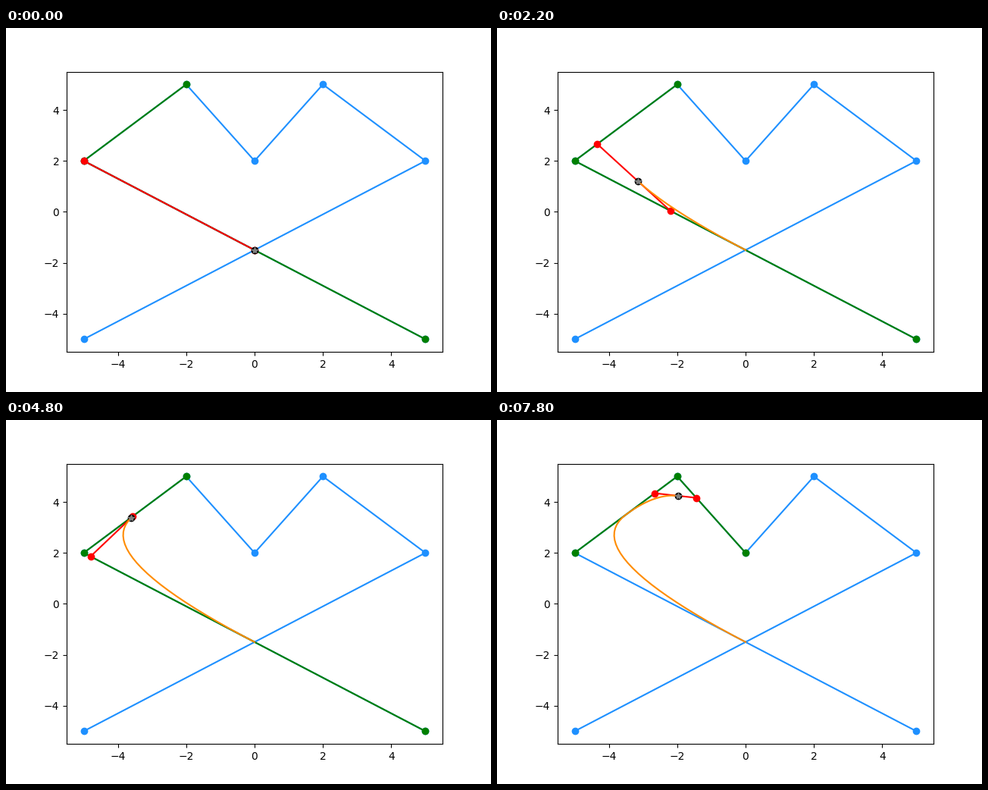
These frames come from a looping animation (640 px wide and 480 px high, 8 s). A matplotlib script:

```python
import numpy as np
import matplotlib.pyplot as plt
from matplotlib.animation import FuncAnimation

FRAMES = 40
INTERVAL = 200
STEP = 0.04

ctrl = np.array([(5, -5), (-5, 2), (-2, 5), (0, 2), (2, 5), (5, 2), (-5, -5)], float)


def lerp(a, b, t):
    return (1 - t) * a + t * b


def de_boor(i):
    """Active control points, inner points and curve point at step i."""
    seg, k = divmod(i, round(1 / STEP))
    t = k * STEP
    p = ctrl[seg:seg + 3]
    inner = np.array([lerp(p[0], p[1], (t + 1) / 2), lerp(p[1], p[2], t / 2)])
    return p, inner, lerp(inner[0], inner[1], t)


fig, ax = plt.subplots(figsize=(6.4, 4.8), dpi=100)
ax.set_xlim(-5.5, 5.5)
ax.set_ylim(-5.5, 5.5)

ax.plot(*ctrl.T, "o-", color="dodgerblue")
active, = ax.plot([], [], "o-", color="green")
chord, = ax.plot([], [], "o-", color="red")
dot, = ax.plot([], [], "o", color="black")
curve, = ax.plot([], [], color="darkorange")
star, = ax.plot([], [], "*", color="gray")

path = np.array([de_boor(i)[2] for i in range(FRAMES)])


def update(i):
    p, inner, point = de_boor(i)
    active.set_data(*p.T)
    chord.set_data(*inner.T)
    curve.set_data(*path[:i + 1].T)
    for mark in (dot, star):
        mark.set_data([point[0]], [point[1]])
    return active, chord, dot, curve, star


anim = FuncAnimation(fig, update, frames=FRAMES, interval=INTERVAL,
                     repeat=True, repeat_delay=0)
plt.show()
```
